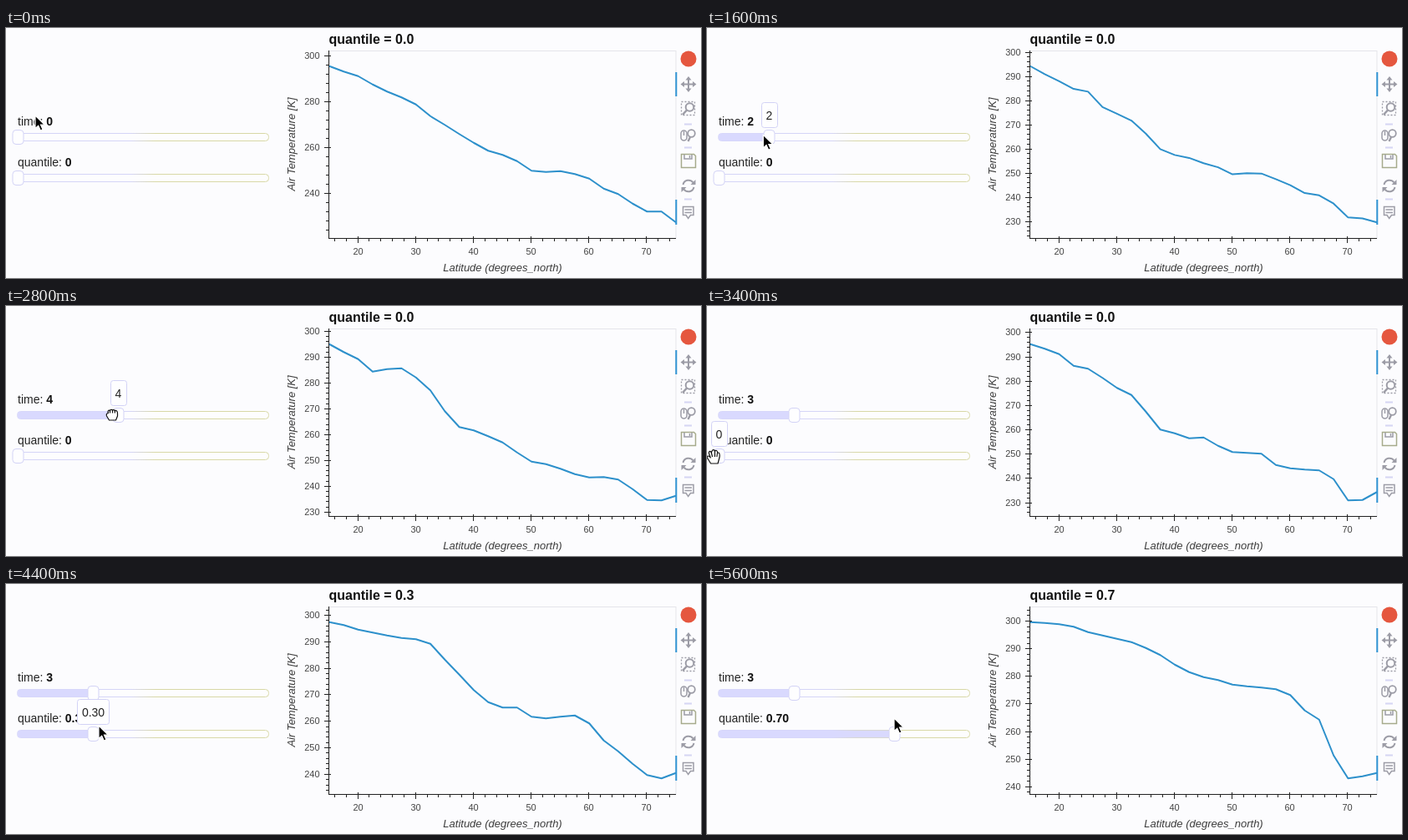
An HTML page that plays this animation: 832x300 px, repeating every 5.8 s.

```html
<!DOCTYPE html>
<html lang="en">
<head>
<meta charset="utf-8">
<title>Air temperature explorer</title>
<style>
  html, body { margin: 0; width: 100%; height: 100%; overflow: hidden; background: #fcfcfe; }
  svg { display: block; font-family: "Liberation Sans", Arial, sans-serif; }
  .label { font-size: 14px; fill: #222; }
  .label .value { font-weight: bold; fill: #111; }
  .title { font-size: 16px; font-weight: bold; fill: #111; }
  .axis-name { font-size: 13px; font-style: italic; fill: #3c3c3c; text-anchor: middle; }
  .tick-label { font-size: 11px; fill: #444; }
  .axis { stroke: #222; fill: none; shape-rendering: crispEdges; }
  .tool { stroke: #9c9ca6; fill: none; stroke-width: 2; }
  .box { fill: #fefeff; stroke: #d3d3f6; }
</style>
</head>
<body>
<svg id="stage" width="832" height="300" viewBox="0 0 832 300">
  <defs>
    <linearGradient id="rim" gradientUnits="userSpaceOnUse" x1="13" y1="0" x2="315" y2="0">
      <stop offset=".45" stop-color="#d5d5f7"/>
      <stop offset=".55" stop-color="#d8d8a6"/>
    </linearGradient>
  </defs>

  <rect x="387" y="27.5" width="415" height="225" fill="none" stroke="#e5e5ea"/>
  <path id="curve" fill="none" stroke="#2d90cb" stroke-width="2" stroke-linejoin="round"/>
  <path class="axis" d="M386.5 27V252.5H802"/>
  <path id="xTicks" class="axis"/>
  <path id="yTicks" class="axis"/>
  <g id="xLabels" class="tick-label" text-anchor="middle"></g>
  <g id="yLabels" class="tick-label" text-anchor="end"></g>
  <text id="title" class="title" x="386.5" y="19"></text>
  <text class="axis-name" x="594.5" y="292">Latitude (degrees_north)</text>
  <text class="axis-name" transform="translate(346 139.5) rotate(-90)">Air Temperature [K]</text>

  <path d="M802.3 53V82M802.3 206V236" stroke="#2f93d3" stroke-width="2"/>
  <circle cx="817" cy="37" r="9.5" fill="#e5573f"/>
  <path d="M812 115.500h9M812 143.500h9M812 205.500h9" stroke="#d6d6f4" stroke-width="2"/>
  <g class="tool">
    <path d="M810 67.500h14M817 60.500v14"/>
    <path d="M817 58l3.500 4.500h-7zM817 77l3.500-4.500h-7zM807.500 67.500l4.500-3.500v7zM826.500 67.500l-4.500-3.500v7z" fill="#9c9ca6" stroke="none"/>
    <rect x="808.500" y="88.500" width="16" height="16" stroke-width="1.300" stroke-dasharray="2 2"/>
    <circle cx="818.500" cy="95" r="4.800" fill="#fcfcfe"/>
    <path d="M815 98.500l-5 5.500" stroke-width="2.600"/>
    <rect x="808" y="123" width="7" height="12" rx="3.500" stroke-width="1.500"/>
    <path d="M811.500 124v5" stroke-width="1.500"/>
    <circle cx="820.500" cy="126.500" r="4.300" stroke-width="1.800"/>
    <path d="M819 131l-2.500 5" stroke-width="2.400"/>
    <path d="M808.500 151.500h15l2 2v14h-17z" stroke="#a6ab8c" stroke-width="1.500"/>
    <path d="M812 152v5h9v-5" stroke-width="1.500"/>
    <path d="M818.500 153v3" stroke-width="1.500"/>
    <path d="M810.500 188a6.700 6.700 0 0 1 12-2.500M823.500 191a6.700 6.700 0 0 1-12 2.500"/>
    <path d="M825.500 182v6h-6zM808.500 197v-6h6z" fill="#9c9ca6" stroke="none"/>
    <path d="M810.500 214.500h12.500v10h-3.500l-2.800 4-2.700-4h-3.500z" stroke-width="1.500"/>
    <path d="M812.500 218h8.500M812.500 221.500h8.500" stroke-width="1.500"/>
  </g>

  <g id="sliders"></g>
  <g id="tip">
    <rect class="box" rx="3" height="30"/>
    <text class="label" text-anchor="middle"></text>
  </g>

  <g id="arrow">
    <path d="M0 0V15.500L3.700 12.200L6.300 18L9 16.800L6.500 11.200H11.500Z" fill="#000" stroke="#fff" stroke-width="1.200"/>
  </g>
  <g id="open" fill="#fff" stroke="#111" stroke-width="1.200" stroke-linejoin="round">
    <path d="M-3.500 8L-7.500 1.500Q-8.500-.5-6.800-1Q-5.500-1.200-3.800 1L-5.800-4.500Q-6-6.500-4.500-6.700Q-3.300-6.600-2.800-5L-2-7Q-1.500-8.500 0-8.300Q1.300-8 1.400-6.500Q2-8 3.300-7.500Q4.600-7 4.500-5.200Q5.500-5.500 6.500-4.500Q7.500-3 7 .5L5 8Z"/>
    <path d="M-2.800-5L-1.500 0M1.400-6.500V0M4.500-5.200L3.800 0" fill="none"/>
  </g>
  <g id="grab" fill="#fff" stroke="#111" stroke-width="1.200" stroke-linejoin="round">
    <path d="M-3.500 7L-6.500 2Q-7.500-1-4.500-1.500L-5-3Q-4.500-5.500-2.500-4.500Q-1.500-6.500 .5-5.200Q2-6 3.300-4.500Q6.500-5 6.500-1V2L4.500 7Z"/>
    <path d="M-2.500-4.500V-1.500M.5-5.200V-1.500M3.300-4.500V-1.500" fill="none"/>
  </g>
</svg>
<script>
const LOOP = 5800, TICK = 200;
const PLOT = { left: 387, right: 802, top: 27, bottom: 252 };
const $ = id => document.getElementById(id);

// Heights run from 46 (max) to 233.5 (min), one per 2.5 degrees of latitude.
const series = (max, min, heights) =>
  heights.map(h => max - (h - 46) / 187.5 * (max - min));
const mix = (a, b, k) => a.map((v, i) => v + (b[i] - v) * k);

const day0 = series(295.4, 227.2, [46, 52.5, 58, 68, 76.5, 83.5, 92, 106, 116.5, 127.5, 138, 147.5,
  152.5, 160, 171.5, 173, 172, 175.5, 181, 193, 199.5, 211, 220.5, 220.5, 233.5]);
const day2 = series(292.75, 230.25, [46, 59, 70.5, 78.5, 76, 106.5, 114, 115.5, 136.5, 163, 166, 163,
  170.5, 172.5, 177.5, 173, 175, 185, 194, 200.5, 199, 207, 231, 233.5, 229]);
const day3 = series(295.1, 230.8, [46, 51.5, 58, 72, 75.5, 86.5, 98.5, 107, 127, 148.5, 153, 159,
  158, 168, 175.5, 176.5, 177.5, 191, 195, 196.5, 197.5, 208, 233.5, 233, 223.5]);
const day4 = series(294.9, 234.4, [46, 55.5, 64, 79, 76, 75, 86, 101.5, 126.5, 145.5, 149.5, 156.5,
  164, 176, 187, 190, 195.5, 202, 206, 205.5, 208.5, 220, 233, 233.5, 228]);
const lowQuantile = series(297.25, 238.3, [46, 49.5, 55, 58.5, 62, 65, 66.5, 72, 91, 109, 127.5, 142,
  148.5, 148.5, 159.5, 161.5, 159.5, 158, 167.5, 188, 201, 216, 229.5, 233.5, 227]);
const highQuantile = series(299.5, 242.9, [46, 47, 48.5, 51.5, 58, 62, 66, 70, 77, 85.5, 97, 106,
  112, 115.5, 121, 123, 124.5, 126.5, 133.5, 152, 163, 206, 233.5, 231, 227]);
const days = [day0, mix(day0, day2, 0.5), day2, day3, day4];

// Each entry: [step at which the value begins, value]
const timeTrack = [[0, 0], [7, 1], [8, 2], [10, 3], [13, 4], [15, 3]];
const plotTrack = [[0, 0], [8, 1], [10, 2], [12, 3], [14, 4], [16, 3]];
const quantileTrack = [[0, 0], [20, 0.1], [21, 0.2], [22, 0.3], [24, 0.4], [25, 0.5], [26, 0.6], [27, 0.7]];
const cursorTrack = [
  [0, 'arrow', 35, 105], [2, 'arrow', 27, 117], [3, 'open', 20, 129], [5, 'open', 18, 130],
  [6, 'grab', 18, 130], [7, 'arrow', 44, 129], [10, 'arrow', 114, 127], [13, 'grab', 128, 130],
  [14, 'grab', 127, 130], [15, 'arrow', 104, 134], [17, 'open', 8, 181], [19, 'grab', 14, 181],
  [20, 'arrow', 46, 172], [22, 'arrow', 111, 170], [27, 'arrow', 226, 170], [28, 'arrow', 224, 161]
];

const keyAt = (track, step) => track.findLastIndex(key => key[0] <= step);
const valueAt = (track, step) => track[keyAt(track, step)][1];

function cursorAt(step) {
  const i = keyAt(cursorTrack, step);
  const [start, kind, x, y] = cursorTrack[i];
  const [end, , x2, y2] = cursorTrack[i + 1] || [start + 1, kind, x, y];
  const k = (step - start) / (end - start);
  return { kind, x: x + (x2 - x) * k, y: y + (y2 - y) * k };
}

function quantileCurve(q) {
  return q <= 0.3 ? mix(day3, lowQuantile, q / 0.3) : mix(lowQuantile, highQuantile, (q - 0.3) / 0.4);
}

const xAt = lat => PLOT.left + (lat - 15) / 60 * (PLOT.right - PLOT.left);

function drawXAxis() {
  let path = '', labels = '';
  for (let lat = 16; lat < 75; lat += 2) {
    const x = Math.round(xAt(lat)) - 0.5, major = lat % 10 === 0;
    path += major ? `M${x} 250V258` : `M${x} 252V256`;
    if (major) labels += `<text x="${x}" y="272">${lat}</text>`;
  }
  $('xTicks').setAttribute('d', path);
  $('xLabels').innerHTML = labels;
}

function drawPlot(values) {
  const max = Math.max(...values), min = Math.min(...values), pad = (max - min) * 0.1;
  const low = min - pad, high = max + pad;
  const yAt = v => PLOT.top + (high - v) / (high - low) * (PLOT.bottom - PLOT.top);
  $('curve').setAttribute('d', 'M' + values.map((v, i) =>
    `${xAt(15 + i * 2.5).toFixed(2)} ${yAt(v).toFixed(2)}`).join('L'));

  const interval = high - low > 80 ? 20 : 10, minor = interval / 5;
  let path = '', labels = '';
  for (let v = Math.ceil(low / minor) * minor; v <= high; v += minor) {
    const y = Math.round(yAt(v)) + 0.5, major = v % interval === 0;
    path += major ? `M381 ${y}H389` : `M383 ${y}H387`;
    if (major) labels += `<text x="375.5" y="${y + 3.5}">${v}</text>`;
  }
  $('yTicks').setAttribute('d', path);
  $('yLabels').innerHTML = labels;
}

function makeSlider(name, y) {
  const group = document.createElementNS('http://www.w3.org/2000/svg', 'g');
  group.innerHTML = `
    <text class="label" x="14" y="${y - 14}">${name}: <tspan class="value"></tspan></text>
    <rect x="13.5" y="${y - 4.5}" width="301" height="9" rx="4" fill="#fdfdfe" stroke="url(#rim)"/>
    <rect class="fill" x="14" y="${y - 4.5}" height="9" rx="3" fill="#d9d9fe"/>
    <rect class="box handle" y="${y - 8.5}" width="13" height="17" rx="4"/>`;
  $('sliders').append(group);
  const find = selector => group.querySelector(selector);
  return (fraction, text) => {
    const x = 14 + 300 * fraction;
    find('.value').textContent = text;
    find('.fill').setAttribute('width', x - 14);
    find('.handle').setAttribute('x', x - 6);
  };
}

function drawTip(fraction, text, y) {
  const x = 14.5 + 300 * fraction, width = text.length > 1 ? 38 : 19;
  const [box, label] = $('tip').children;
  box.setAttribute('x', Math.floor(x - width / 2) + 0.5);
  box.setAttribute('y', y - 41.5);
  box.setAttribute('width', width);
  label.setAttribute('x', x);
  label.setAttribute('y', y - 21.5);
  label.textContent = text;
}

const setTime = makeSlider('time', 131);
const setQuantile = makeSlider('quantile', 180);
const show = (id, visible) => $(id).setAttribute('visibility', visible ? 'visible' : 'hidden');

function render(step) {
  const time = valueAt(timeTrack, step), quantile = valueAt(quantileTrack, step);
  const quantileText = quantile ? quantile.toFixed(2) : '0';
  setTime(time / 10, time);
  setQuantile(quantile, quantileText);
  $('title').textContent = `quantile = ${quantile.toFixed(1)}`;
  drawPlot(quantile ? quantileCurve(quantile) : days[valueAt(plotTrack, step)]);

  const onTime = step >= 3 && step <= 14, onQuantile = step >= 17 && step <= 27;
  show('tip', onTime || onQuantile);
  if (onTime) drawTip(time / 10, String(time), 131);
  if (onQuantile) drawTip(quantile, quantileText, 180);

  const cursor = cursorAt(step);
  for (const kind of ['arrow', 'open', 'grab']) show(kind, kind === cursor.kind);
  $(cursor.kind).setAttribute('transform', `translate(${cursor.x} ${cursor.y})`);
}

let shown = -1;
const begin = performance.now();
function frame() {
  const step = Math.floor((performance.now() - begin) % LOOP / TICK);
  if (step !== shown) render(shown = step);
  requestAnimationFrame(frame);
}
drawXAxis();
frame();
</script>
</body>
</html>
```
